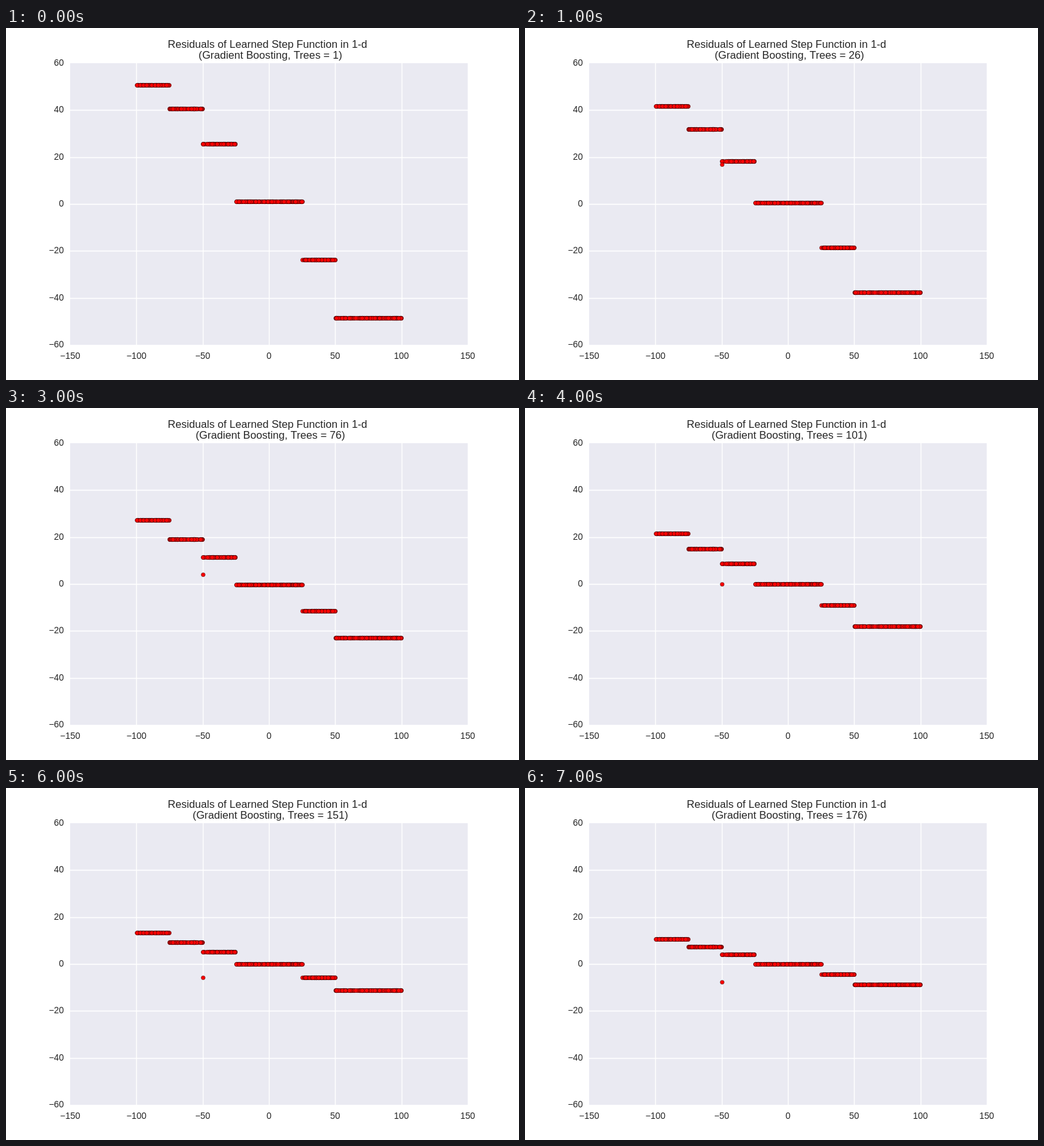
These frames come from a looping animation (800x550 px, 8 s). An HTML page with a canvas:

```html
<!DOCTYPE html>
<html lang="en">
<head>
<meta charset="utf-8">
<title>Residuals</title>
<style>
  html, body { margin: 0; width: 100%; height: 100%; overflow: hidden; background: #fff; }
  canvas { display: block; }
</style>
</head>
<body>
<canvas id="chart" width="800" height="550"></canvas>
<script>
const ctx = document.getElementById('chart').getContext('2d');
const STEP_MS = 1000, STEPS = 8, TREES_PER_STEP = 25;
const PLOT = { left: 100, top: 55, width: 620, height: 440 };
const FONT = '"Liberation Sans", Arial, sans-serif';

// Horizontal extent of each plateau and its height at every step, in pixels.
const plateaus = [
  { from: 204, to: 254, y: [89, 122, 151, 175, 196, 213, 226, 236] },
  { from: 255, to: 306, y: [126, 158, 184, 205, 220, 232, 241, 248] },
  { from: 307, to: 357, y: [181, 208, 222, 233, 243, 250, 256, 260] },
  { from: 359, to: 462, y: [271, 273, 275, 276, 275, 275, 275, 275] },
  { from: 462, to: 513, y: [362, 343, 329, 317, 308, 301, 296, 291] },
  { from: 514, to: 616, y: [453, 413, 382, 359, 341, 327, 316, 307] }
];
const outlier = { x: 307, y: [181, 213, 240, 260, 275, 287, 296, 303] };

function seededRandom(seed) {
  return () => (seed = (seed * 16807) % 2147483647) / 2147483647;
}

const random = seededRandom(4217);
for (const p of plateaus) {
  const span = p.to - p.from + 1;
  p.xs = Array.from({ length: Math.round(span * 1.6) },
    () => p.from + Math.floor(random() * span));
  p.xs.splice(Math.floor(random() * p.xs.length), 0, p.from, p.to);
}

const xPixel = v => PLOT.left + (v + 150) / 300 * PLOT.width;
const yPixel = v => PLOT.top + (60 - v) / 120 * PLOT.height;
const label = v => String(v).replace('-', '\u2212');

function line(x1, y1, x2, y2) {
  ctx.beginPath();
  ctx.moveTo(x1, y1);
  ctx.lineTo(x2, y2);
  ctx.stroke();
}

function drawAxes() {
  const { left, top, width, height } = PLOT;
  ctx.fillStyle = '#fff';
  ctx.fillRect(0, 0, 800, 550);
  ctx.fillStyle = '#eaeaf2';
  ctx.fillRect(left, top, width, height);
  ctx.strokeStyle = '#fff';
  ctx.lineWidth = 1.39;
  ctx.fillStyle = '#262626';
  ctx.font = '13.89px ' + FONT;

  ctx.textAlign = 'center';
  for (let v = -150; v <= 150; v += 50) {
    const x = Math.round(xPixel(v)) + 0.5;
    if (Math.abs(v) < 150) line(x, top, x, top + height);
    ctx.fillText(label(v), xPixel(v), 517);
  }
  ctx.textAlign = 'right';
  for (let v = -60; v <= 60; v += 20) {
    const y = Math.round(yPixel(v)) + 0.5;
    if (Math.abs(v) < 60) line(left, y, left + width, y);
    ctx.fillText(label(v), 90.3, Math.round(yPixel(v)) + 4);
  }
}

function drawTitle(trees) {
  ctx.fillStyle = '#262626';
  ctx.font = '16.67px ' + FONT;
  ctx.textAlign = 'center';
  ctx.fillText('Residuals of Learned Step Function in 1-d ', 410, 31);
  ctx.fillText(` (Gradient Boosting, Trees = ${trees})`, 410, 48);
}

function drawDot(x, y) {
  ctx.beginPath();
  ctx.arc(x + 0.5, y + 0.5, 3.1, 0, Math.PI * 2);
  ctx.fill();
  ctx.stroke();
}

function draw(step) {
  drawAxes();
  drawTitle(1 + step * TREES_PER_STEP);
  ctx.fillStyle = '#f00';
  ctx.strokeStyle = '#000';
  ctx.lineWidth = 0.42;
  for (const p of plateaus) {
    for (const x of p.xs) drawDot(x, p.y[step]);
  }
  drawDot(outlier.x, outlier.y[step]);
}

const start = performance.now();
let shown = -1;
function tick() {
  const step = Math.floor((performance.now() - start) / STEP_MS) % STEPS;
  if (step !== shown) draw(shown = step);
  requestAnimationFrame(tick);
}
tick();
</script>
</body>
</html>
```
